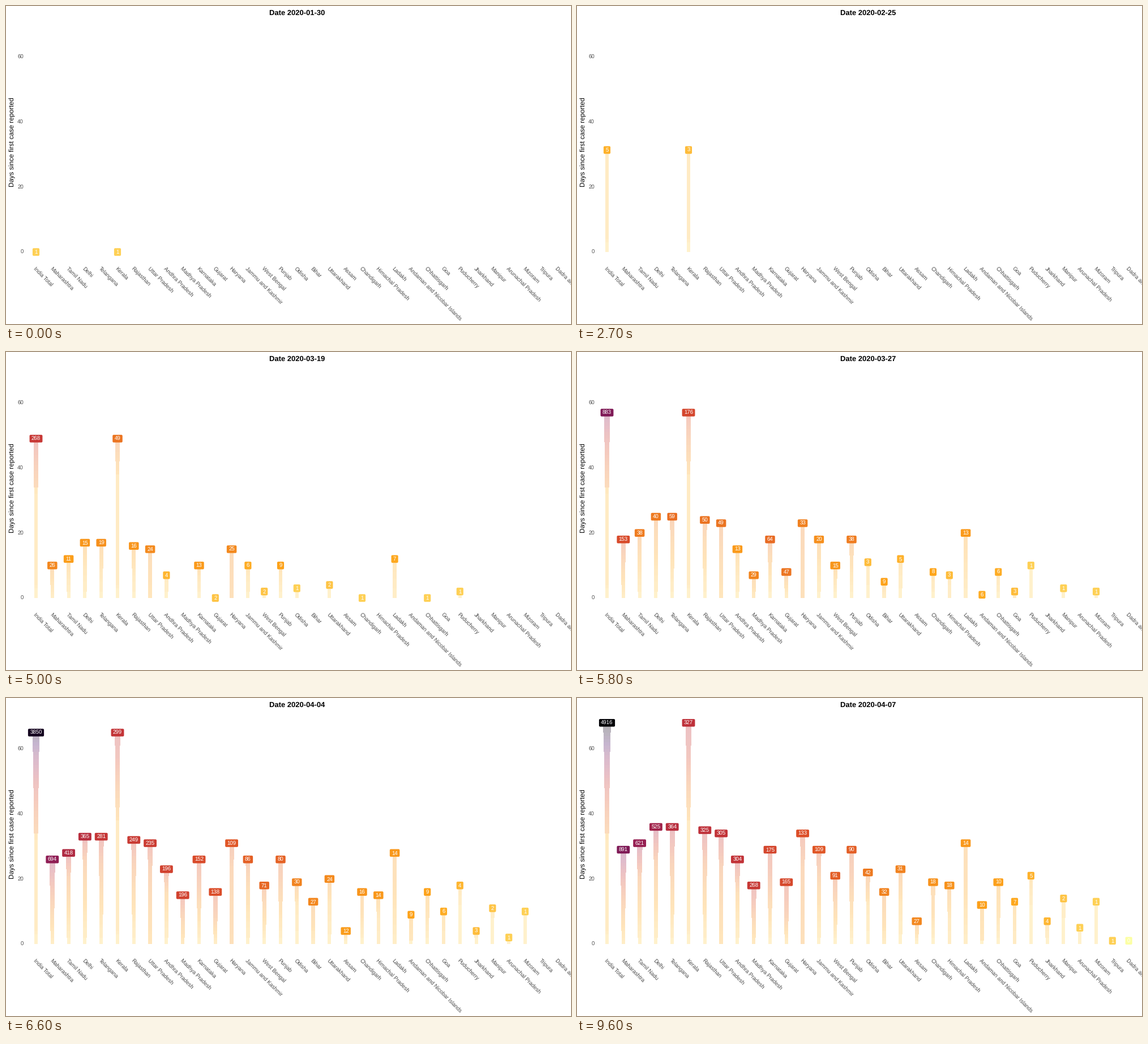
These frames come from a looping animation (998x561 px, 10 s). A matplotlib script:

```python
import numpy as np
import matplotlib.pyplot as plt
from matplotlib.animation import FuncAnimation
from matplotlib.collections import PolyCollection
from matplotlib.colors import LinearSegmentedColormap
from matplotlib.patches import FancyBboxPatch

W, H, DPI = 998, 561, 100
PT = 72 / DPI                      # points per pixel
FRAMES, INTERVAL = 100, 100
LAST_FRAME, LAST_DAY = 69, 68      # the rest of the loop is a pause
MID_DAY = 57                       # growth slows down after this day
X0, DX = 53, 28.8
Y0, DY = 434, 5.738
MAX_COUNT = 4916
ALPHA = 0.3

plt.rcParams["font.family"] = "Liberation Sans"
plt.rcParams["text.hinting"] = "none"

heat = LinearSegmentedColormap.from_list("heat", [
    (0, "#FCFFA4"), (0.12, "#FED055"), (0.2, "#FEA519"), (0.4, "#DE5027"),
    (0.5, "#C23338"), (0.6, "#941E53"), (0.8, "#430A60"), (1, "#000004")], N=1024)

# First day, then the counts on that day, on MID_DAY and on LAST_DAY.
STATES = {
    "India Total": (0, 1, 883, 4916),
    "Maharashtra": (39, 2, 153, 891),
    "Tamil Nadu": (37, 1, 38, 621),
    "Delhi": (32, 1, 40, 525),
    "Telangana": (32, 1, 59, 364),
    "Kerala": (0, 1, 176, 327),
    "Rajasthan": (33, 1, 50, 325),
    "Uttar Pradesh": (34, 6, 49, 305),
    "Andhra Pradesh": (42, 1, 13, 304),
    "Madhya Pradesh": (50, 4, 29, 268),
    "Karnataka": (39, 1, 64, 175),
    "Gujarat": (49, 2, 47, 165),
    "Haryana": (34, 14, 33, 133),
    "Jammu and Kashmir": (39, 1, 20, 109),
    "West Bengal": (47, 1, 15, 91),
    "Punjab": (39, 1, 38, 90),
    "Odisha": (46, 1, 3, 42),
    "Bihar": (52, 2, 9, 32),
    "Uttarakhand": (45, 1, 5, 31),
    "Assam": (61, 1, None, 27),
    "Chandigarh": (49, 1, 8, 18),
    "Himachal Pradesh": (50, 2, 3, 18),
    "Ladakh": (37, 2, 13, 14),
    "Andaman and Nicobar Islands": (56, 1, 6, 10),
    "Chhattisgarh": (49, 1, 6, 10),
    "Goa": (55, 3, 3, 7),
    "Puducherry": (47, 1, 1, 5),
    "Jharkhand": (61, 1, None, 4),
    "Manipur": (54, 1, 1, 2),
    "Arunachal Pradesh": (63, 1, None, 1),
    "Mizoram": (55, 1, 1, 1),
    "Tripura": (67, 1, None, 1),
    "Dadra and Nagar Haveli": (67, 0, None, 0),
}
# Early cases: a quiet month, then a jump.
EARLY = {
    "India Total": {3: 2, 4: 3, 32: 5, 33: 5, 34: 28},
    "Kerala": {3: 2, 4: 3, 32: 3, 37: 3, 38: 8},
}


def slowed(day):
    u = np.clip((np.asarray(day) - MID_DAY) / (LAST_DAY - MID_DAY), 0, 1)
    return np.where(u > 0, MID_DAY + (LAST_DAY - MID_DAY) * (1 - (1 - u) ** 1.5), day)


def history(name):
    """Start day, reported days, their counts and the frames they fall on."""
    start, first, mid, last = STATES[name]
    known = {start: first, **EARLY.get(name, {}), LAST_DAY: last}
    if mid is not None:
        known[MID_DAY] = mid
    keys = sorted(known)
    days = [d for d in range(start, LAST_DAY + 1) if d in (0, 3, 4) or d >= 32]
    logs = np.interp(slowed(days), slowed(keys), np.log1p([known[k] for k in keys]))
    counts = np.rint(np.expm1(logs)).astype(int)
    frames = [round(d * LAST_FRAME / LAST_DAY) for d in days]
    return start, days, counts, frames


def level(count):
    return (count / MAX_COUNT) ** 0.25


def tint(count):
    """Bar colour: the label colour laid over white."""
    return tuple(1 - ALPHA * (1 - np.array(heat(level(count))[:3])))


def ease(u):
    return 4 * u ** 3 if u < 0.5 else 1 - 4 * (1 - u) ** 3


def pose(days, counts, frames, i):
    """Index of the last report passed, current day and current count."""
    k = int(np.searchsorted(frames, i, side="right")) - 1
    if k < 0:
        return None
    if k == len(days) - 1:
        return k, days[k], counts[k]
    e = ease((i - frames[k]) / (frames[k + 1] - frames[k]))
    day = days[k] + (days[k + 1] - days[k]) * e
    return k, day, int(round(counts[k] + (counts[k + 1] - counts[k]) * e))


fig = plt.figure(figsize=(W / DPI, H / DPI), dpi=DPI, facecolor="white")
ax = fig.add_axes([0, 0, 1, 1])
ax.set_xlim(0, W)
ax.set_ylim(H, 0)
ax.axis("off")


def write(x, y, s, size, **kw):
    return ax.text(x, y, s, fontsize=size * PT, **{"va": "baseline", **kw})


title = write(514, 15.8, "", 13, weight="bold", ha="center", color="black")
write(15, 239.5, "Days since first case reported", 12, rotation=90,
      rotation_mode="anchor", ha="center", color="black")
for tick in range(0, 61, 20):
    write(30.8, Y0 - tick * DY + 3.4, str(tick), 9.6, ha="right", color="#4D4D4D")

bars = PolyCollection([], linewidths=0, zorder=2)
ax.add_collection(bars, autolim=False)
tracks = []
for n, name in enumerate(STATES):
    x = X0 + n * DX
    write(x - 5, 464, name, 9.6, rotation=-45, rotation_mode="anchor",
          ha="left", color="#4D4D4D")
    box = FancyBboxPatch((x, Y0), 12, 13.5, linewidth=0, zorder=3,
                         boxstyle="round,pad=0,rounding_size=2")
    ax.add_patch(box)
    text = write(x, Y0, "", 9.6, ha="center", color="white", zorder=4)
    tracks.append((x, box, text, *history(name)))


def draw(frame):
    i = min(frame, LAST_FRAME)
    date = np.datetime64("2020-01-30") + i * LAST_DAY // LAST_FRAME
    title.set_text(f"Date {date}")
    quads, colors = [], []
    for x, box, text, start, days, counts, frames in tracks:
        now = pose(days, counts, frames, i)
        box.set_visible(now is not None)
        text.set_visible(now is not None)
        if now is None:
            continue
        k, day, count = now
        edges = days[:k + 1] + [day]
        for a, b, v in zip(edges, edges[1:], counts):
            if b > a:
                half = (5 + 8.6 * level(v)) / 2
                low = Y0 - (a - start) * DY
                top = Y0 - (b - start) * DY - 0.5
                quads.append([(x - half, low), (x + half, low),
                              (x + half, top), (x - half, top)])
                colors.append(tint(v))
        y = Y0 - (day - start) * DY
        w = 6.8 + 5.35 * len(str(count))
        box.set_bounds(x - w / 2, y - 6.75, w, 13.5)
        box.set_facecolor(heat(level(count)))
        text.set_position((x, y + 3.3))
        text.set_text(str(count))
    bars.set_verts(quads)
    bars.set_facecolor(colors)
    return []


anim = FuncAnimation(fig, draw, frames=FRAMES, interval=INTERVAL, repeat=True)
plt.show()
```
